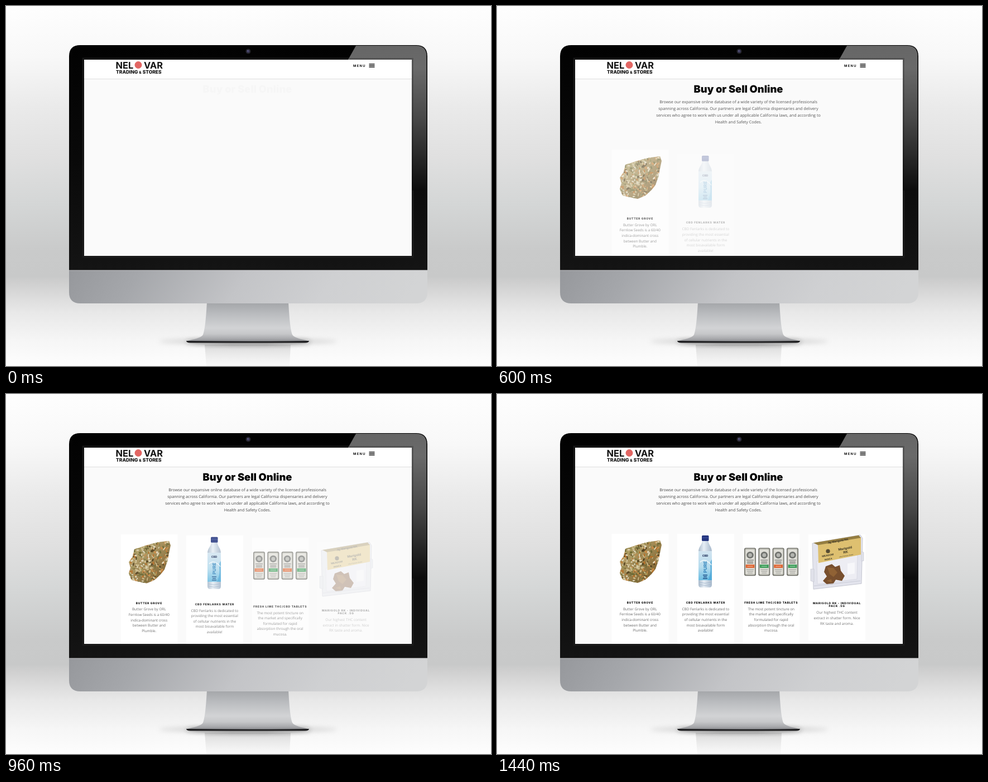
Recreate the animation shown at these times as an HTML page. Size 869 by 644 pixels, loop 3440 ms.

```html
<!DOCTYPE html>
<html lang="en">
<head>
<meta charset="utf-8">
<title>Online shop on a desktop screen</title>
<style>
  html, body { margin: 0; width: 100%; height: 100%; overflow: hidden; background: #fdfdfd; }
  svg { display: block; width: 869px; height: 644px; }
  text { text-rendering: geometricPrecision; }
  .wide { font-family: Inter, sans-serif; font-weight: 800; }
  .body { font-family: "Open Sans", sans-serif; }
  .mid { text-anchor: middle; }
  .end { text-anchor: end; }

  /* --t is the clock in ms, --start the moment an item sets off */
  .fade, .card {
    animation: fade 800ms ease both paused;
    animation-delay: calc((var(--start) - var(--t, 0)) * 1ms);
  }
  .card { animation-name: rise; animation-duration: 960ms; }
  @keyframes fade { from { opacity: 0; } to { opacity: 1; } }
  @keyframes rise {
    from { opacity: 0; transform: translateY(20px); }
    to { opacity: 1; transform: translateY(0); }
  }

  .title { font-size: 18.3px; font-weight: 900; fill: #000; }
  .intro { font-size: 7.2px; fill: #4a4a4a; }
  .name { font-size: 5px; letter-spacing: .7px; fill: #000; }
  .info { font-size: 6.4px; fill: #6a6a6a; }
</style>
</head>
<body>
<svg viewBox="0 0 869 644" xmlns="http://www.w3.org/2000/svg">
  <defs>
    <linearGradient id="wall" x2="0" y2="1">
      <stop offset="0" stop-color="#fefefe"/>
      <stop offset=".14" stop-color="#f8f8f8"/>
      <stop offset=".28" stop-color="#eaeaea"/>
      <stop offset=".42" stop-color="#e0e0e0"/>
      <stop offset=".55" stop-color="#d4d6d6"/>
      <stop offset=".68" stop-color="#c9caca"/>
      <stop offset=".75" stop-color="#c8c9c9"/>
      <stop offset=".79" stop-color="#d6d6d6"/>
      <stop offset=".85" stop-color="#e8e8e8"/>
      <stop offset=".93" stop-color="#f6f6f6"/>
      <stop offset="1" stop-color="#fdfdfd"/>
    </linearGradient>
    <linearGradient id="bezel" x2="0" y2="1">
      <stop offset="0" stop-color="#020202"/>
      <stop offset=".5" stop-color="#090909"/>
      <stop offset="1" stop-color="#141414"/>
    </linearGradient>
    <linearGradient id="glare" x2="0" y2="1">
      <stop offset="0" stop-color="#666"/>
      <stop offset=".15" stop-color="#6a6a6a"/>
      <stop offset=".5" stop-color="#484848"/>
      <stop offset=".8" stop-color="#242424"/>
      <stop offset="1" stop-color="#0c0c0c"/>
    </linearGradient>
    <linearGradient id="chin" x2="1" y2=".06">
      <stop offset="0" stop-color="#96989c"/>
      <stop offset=".2" stop-color="#a5a7ab"/>
      <stop offset=".5" stop-color="#c3c4c7"/>
      <stop offset=".75" stop-color="#cfd0d2"/>
      <stop offset="1" stop-color="#d3d4d5"/>
    </linearGradient>
    <linearGradient id="neck" x2="0" y2="1">
      <stop offset="0" stop-color="#a3a5a8"/>
      <stop offset=".3" stop-color="#babcbf"/>
      <stop offset=".65" stop-color="#d2d3d5"/>
      <stop offset=".8" stop-color="#c6c7c9"/>
      <stop offset=".92" stop-color="#a9aaad"/>
      <stop offset="1" stop-color="#85868a"/>
    </linearGradient>
    <linearGradient id="mirror" x2="0" y2="1">
      <stop offset="0" stop-color="#cfcfcf" stop-opacity=".75"/>
      <stop offset="1" stop-color="#eee" stop-opacity=".3"/>
    </linearGradient>
    <linearGradient id="water" x2="1" y2="0">
      <stop offset="0" stop-color="#a9bacb"/>
      <stop offset=".4" stop-color="#e6eef5"/>
      <stop offset="1" stop-color="#a6b8cb"/>
    </linearGradient>
    <linearGradient id="label" x2="0" y2="1">
      <stop offset="0" stop-color="#d2e4f0"/>
      <stop offset=".55" stop-color="#b6dcee"/>
      <stop offset="1" stop-color="#6cbde2"/>
    </linearGradient>
    <linearGradient id="flower" x2="1" y2="1">
      <stop offset=".2" stop-color="#b9a66f"/>
      <stop offset=".8" stop-color="#7d612f"/>
    </linearGradient>
    <filter id="soft" x="-30%" y="-600%" width="160%" height="1300%"><feGaussianBlur stdDeviation="4"/></filter>
    <clipPath id="screen"><rect x="140" y="96" width="587" height="351"/></clipPath>
    <clipPath id="budShape">
      <path d="M262 267L275 264L292 262L295 270L292 284L289 299L284 313L277 322L266 332L252 338L238 335L225 332L220 320L223 310L220 300L227 290L230 277L245 272Z"/>
    </clipPath>
    <g id="tin">
      <rect width="21" height="50" rx="3" fill="#66665f"/>
      <rect x="1.2" y="1.2" width="18.600" height="47.600" rx="2.4" fill="#b4b4ab"/>
      <rect x="2.6" y="3" width="15.8" height="44" rx="1.5" fill="#e0dfd8"/>
      <circle cx="10.5" cy="13" r="6.2" fill="#6f716d"/>
      <circle cx="10.5" cy="13" r="3.4" fill="#b4b5b0"/>
      <path d="M4 22H17M5 25H16M5 27.5H16" stroke="#5f5f5d"/>
      <path d="M4 39H17M5 42H16M6 45H15" stroke="#8d8d88" stroke-width=".9"/>
      <rect x="2.6" y="30" width="15.8" height="6" fill="currentColor"/>
      <path d="M5.5 33H15.5" stroke="#fff" stroke-width="1.2" opacity=".5"/>
    </g>
  </defs>

  <rect width="869" height="644" fill="url(#wall)"/>

  <!-- stand -->
  <path d="M356 606H510L508 644H359Z" fill="url(#mirror)"/>
  <ellipse cx="434" cy="600" rx="160" ry="5" fill="#999" opacity=".35" filter="url(#soft)"/>
  <ellipse cx="434" cy="601" rx="112" ry="4" fill="#222" opacity=".6" filter="url(#soft)"/>
  <path d="M360 530H506C508 565 510 580 513 588C516 594 530 596 543 599.5Q434 602 323 599.5C336 596 350 594 353 588C356 580 358 565 360 530Z" fill="url(#neck)"/>
  <path d="M323 599Q434 600.5 543 599Q543 602 536 602.6H330Q323 602 323 599Z" fill="#1d1d1f"/>

  <!-- monitor -->
  <path d="M113 472H755V512Q755 532 735 532H133Q113 532 113 512Z" fill="url(#chin)"/>
  <path d="M113 472.5V90Q113 70 133 70H735Q755 70 755 90V472.5Z" fill="url(#bezel)"/>
  <path d="M113 473H755" stroke="#d8d8da" opacity=".6"/>
  <rect x="138" y="94" width="591" height="355" fill="none" stroke="#1c1c1c" stroke-width="3" opacity=".75"/>
  <path d="M627 71H735Q753.5 71 753.5 90V330H727V96H613Z" fill="url(#glare)"/>
  <path d="M615 94.500H728.500V330" fill="none" stroke="#000" stroke-width="3" opacity=".2"/>
  <circle cx="434" cy="81" r="4.6" fill="#222227"/>
  <circle cx="434" cy="81" r="2.7" fill="#3d3b5c"/>
  <circle cx="433.3" cy="80.2" r="1" fill="#6a6a92"/>

  <g clip-path="url(#screen)">
    <rect x="140" y="96" width="587" height="351" fill="#fafafa"/>
    <rect x="140" y="96" width="587" height="34" fill="#fff"/>
    <path d="M140 130.5H727" stroke="#dedede"/>

    <g class="wide" fill="#111">
      <text x="196.5" y="112" font-size="16.4" style="font-weight:700">NEL</text>
      <circle cx="237" cy="105.5" r="6.5" fill="#e26663"/>
      <text class="end" x="281" y="112" font-size="16.4" style="font-weight:700">VAR</text>
      <text x="197" y="120.6" font-size="8.5">TRADING <tspan font-size="6.6">&amp;</tspan> STORES</text>
      <text x="622" y="109.1" font-size="5.8" letter-spacing="1.3" style="font-weight:700">MENU</text>
    </g>
    <path d="M650.5 104H660.5M650.5 106.7H660.5M650.5 109.4H660.5" stroke="#111" stroke-width="1.4"/>

    <text class="wide mid title fade" style="--start:-20" x="432.5" y="155">Buy or Sell Online</text>
    <g id="intro" class="body mid intro fade" style="--start:40"></g>

    <g class="card" style="--start:240">
      <rect x="205.5" y="250" width="102" height="203" fill="#fff"/>
      <g id="bud" clip-path="url(#budShape)">
        <rect x="218" y="260" width="80" height="80" fill="url(#flower)"/>
      </g>
    </g>

    <g class="card" style="--start:420">
      <rect x="323" y="250" width="102" height="203" fill="#fff"/>
      <path d="M368 262H378.5C379 270 385 273 385 282V341Q385 346 381 346H365.5Q361 346 361 341V282C361 273 367.5 270 368 262Z" fill="url(#water)"/>
      <rect x="367" y="253" width="12.5" height="10" rx="1.5" fill="#25367f"/>
      <path d="M368 257H378.5" stroke="#4b5fae" stroke-width=".8"/>
      <rect x="361" y="281" width="24" height="52" fill="url(#label)"/>
      <path d="M385 296C377 305 388 311 378 333H385Z" fill="#3f9fd4" opacity=".65"/>
      <path d="M364 301C370 294 379 299 384 306" fill="none" stroke="#fff" stroke-width="1.5" opacity=".8"/>
      <text class="wide mid" x="373" y="290.5" font-size="5" fill="#1d2c55">CBD</text>
      <text class="wide" transform="translate(376 320) rotate(-90)" font-size="8" fill="#3f8cc0">PURE</text>
      <path d="M369 324H377M370 327H376M369 330H377" stroke="#1f4f86" stroke-width="1.3"/>
      <path d="M363 337Q373 340 383 337M363 341Q373 344 383 341" fill="none" stroke="#9fb2c8" stroke-width=".8"/>
    </g>

    <g class="card" style="--start:595">
      <rect x="440.5" y="250" width="102" height="203" fill="#fff"/>
      <use href="#tin" x="443" y="275" color="#de6430"/>
      <use href="#tin" x="468.3" y="275" color="#3a9c57"/>
      <use href="#tin" x="493.6" y="275" color="#de6430"/>
      <use href="#tin" x="519" y="275" color="#3a9c57"/>
    </g>

    <g class="card" style="--start:765">
      <rect x="558" y="250" width="102" height="190" fill="#fff"/>
      <path d="M565 266L651 251L655 257L653 338L567 348Z" fill="#e2e3ec" stroke="#c3c5d0"/>
      <path d="M573 298L646 287L645 330L574 339Z" fill="#ececf3" stroke="#d2d3dd" stroke-width=".8"/>
      <path d="M562 312H568V335L562 333ZM653 281L657 282V297L653 298Z" fill="#dfe0e9" stroke="#c3c5d0" stroke-width=".7"/>
      <path d="M628 302L641 300V320L628 322Z" fill="#fff" opacity=".6"/>
      <path d="M575 268L652 255V286L576 301Z" fill="#dcbd68"/>
      <path d="M567 265L648 251.5L652 256L575 269Z" fill="#8f7636"/>
      <path d="M589 307L600 303L606 308L614 305L616 315L623 324L618 333L607 331L602 339L592 340L584 333L591 325L586 317Z" fill="#704421"/>
      <path d="M592 309L603 310L610 318L603 326L596 321ZM590 333L599 330L600 336Z" fill="#8a5929"/>
      <path d="M568 342L651 333" stroke="#cfd1dc" stroke-width="1.5"/>
      <g class="mid" font-family="Liberation Sans, sans-serif" font-weight="700" fill="#2d2717">
        <text transform="translate(611 263.5) rotate(-10)" font-size="5">.5g Marigold RK</text>
        <text transform="translate(624 277) rotate(-10)" font-size="6">Marigold</text>
        <text transform="translate(625 283.5) rotate(-10)" font-size="6">RK</text>
        <text transform="translate(626 289) rotate(-10)" font-size="2.6" font-weight="400">Ultra Premium Shatter</text>
        <text transform="translate(593 289) rotate(-10)" font-size="4.6">MEADOW</text>
        <text transform="translate(594 295.5) rotate(-10)" font-size="4">INDICA</text>
      </g>
      <circle cx="593" cy="280" r="3.6" fill="#4b4026"/>
    </g>
  </g>
</svg>

<script>
  const LOOP = 3440, STEP = 60, LAST = 1440;
  const $ = q => document.querySelector(q);

  function add(parent, tag, attrs, text = '') {
    const el = document.createElementNS('http://www.w3.org/2000/svg', tag);
    for (const k in attrs) el.setAttribute(k, attrs[k]);
    el.textContent = text;
    parent.append(el);
  }

  function addLines(parent, lines, x, y, gap, cls = '') {
    lines.forEach((line, i) => add(parent, 'text', { x, y: y + i * gap, class: cls }, line));
  }

  addLines($('#intro'), [
    'Browse our expansive online database of a wide variety of the licensed professionals',
    'spanning across California. Our partners are legal California dispensaries and delivery',
    'services who agree to work with us under all applicable California laws, and according to',
    'Health and Safety Codes.'
  ], 432.5, 174, 12);

  const items = [
    { x: 256.3, name: ['BUTTER GROVE'],
      info: ['Butter Grove by ORL', 'Fernlow Seeds is a 60/40', 'indica-dominant cross', 'between Butter and', 'Plumble.'] },
    { x: 373.8, name: ['CBD FENLARKS WATER'],
      info: ['CBD Fenlarks is dedicated to', 'providing the most essential', 'of cellular nutrients in the', 'most bioavailable form', 'available!'] },
    { x: 491.2, name: ['FRESH LIME THC/CBD TABLETS'],
      info: ['The most potent tincture on', 'the market and specifically', 'formulated for rapid', 'absorption through the oral', 'mucosa.'] },
    { x: 609, name: ['MARIGOLD RK - INDIVIDUAL', 'PACK .5G'],
      info: ['Our highest THC content', 'extract in shatter form. Nice', 'RK taste and aroma.'] }
  ];
  document.querySelectorAll('.card').forEach((card, i) => {
    const { x, name, info } = items[i];
    addLines(card, name, x, 374.8, 5.5, 'wide mid name');
    addLines(card, info, x, 386.7 + (name.length - 1) * 5.5, 9.6, 'body mid info');
  });

  // speckled flower: small flecks scattered inside its outline
  let seed = 11;
  const rnd = () => (seed = seed * 16807 % 2147483647) / 2147483647;
  const tones = ['#8b8149', '#cbbb8c', '#b56f28', '#574522', '#e0d6b8', '#a3965a', '#c98a45', '#6f6a36'];
  for (let i = 0; i < 420; i++) {
    const x = 218 + rnd() * 80, y = 260 + rnd() * 80;
    add($('#bud'), 'ellipse', {
      rx: 1.3 + rnd() * 2.4, ry: .7 + rnd() * 1.1, fill: tones[Math.floor(rnd() * tones.length)],
      transform: `translate(${x.toFixed(1)} ${y.toFixed(1)}) rotate(${Math.floor(rnd() * 180)})`
    });
  }

  // the clock ticks in steps and rests on the last pose
  function tick(now) {
    const t = Math.min(LAST, Math.floor(now % LOOP / STEP) * STEP);
    document.documentElement.style.setProperty('--t', t);
    requestAnimationFrame(tick);
  }
  tick(0);
</script>
</body>
</html>
```
